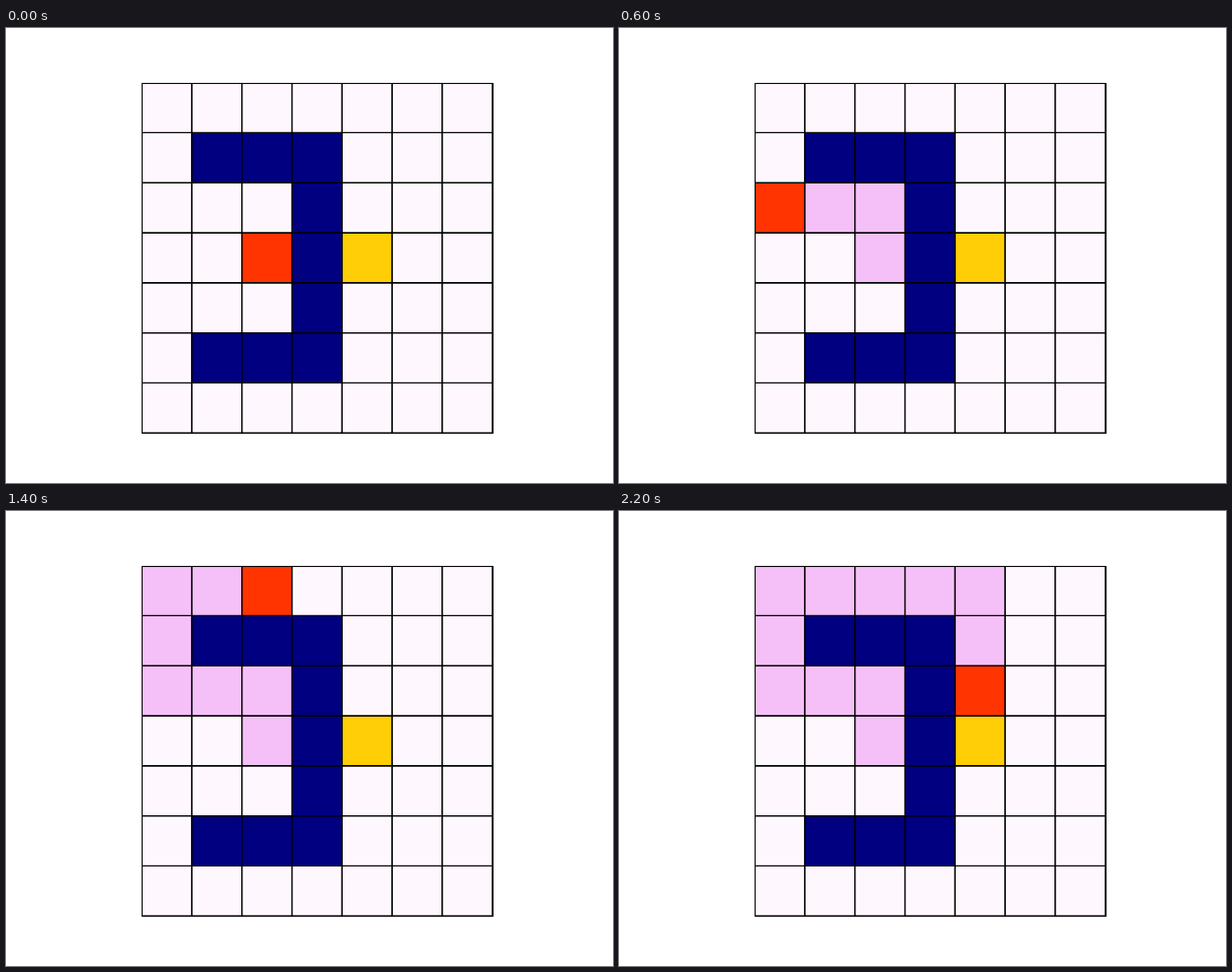
Animation of 640 by 480 pixels, one loop 2.6 s. Source, as an HTML page with a canvas:

```html
<!DOCTYPE html>
<html lang="en">
<head>
<meta charset="utf-8">
<title>Grid walk</title>
<style>
html, body { margin: 0; width: 100%; height: 100%; overflow: hidden; background: #fff; }
canvas { display: block; }
</style>
</head>
<body>
<canvas id="stage" width="640" height="480"></canvas>
<script>
const ctx = document.getElementById('stage').getContext('2d');

const LOOP = 2600, STEP = 200;
const N = 7, CELL = 52.8, LEFT = 143.2, TOP = 57.6;
const EMPTY = 'rgb(254,248,254)', WALL = 'rgb(0,0,128)', TRAIL = 'rgb(245,192,247)';
const WALKER = 'rgb(255,52,0)', GOAL = 'rgb(255,206,6)';

const map = [
  '.......',
  '.###...',
  '...#...',
  '...#G..',
  '...#...',
  '.###...',
  '.......'
];
const moves = { U: [0, -1], D: [0, 1], L: [-1, 0], R: [1, 0] };

// Cells visited in order, from the start cell
const path = [[2, 3]];
for (const m of 'ULLUURRRRDD') {
  const [x, y] = path[path.length - 1];
  path.push([x + moves[m][0], y + moves[m][1]]);
}

function cellColor(x, y, step) {
  const visit = path.findIndex(p => p[0] === x && p[1] === y);
  if (visit === step) return WALKER;
  if (visit >= 0 && visit < step) return TRAIL;
  return { '#': WALL, G: GOAL }[map[y][x]] || EMPTY;
}

function draw(step) {
  ctx.fillStyle = '#fff';
  ctx.fillRect(0, 0, 640, 480);
  ctx.strokeStyle = '#000';

  ctx.save();
  ctx.beginPath();
  ctx.rect(143, 58, 370, 369);
  ctx.clip();
  ctx.lineWidth = 100 / 72;
  // Bottom row first, so upper cells overlap lower ones
  for (let y = N - 1; y >= 0; y--) {
    for (let x = 0; x < N; x++) {
      ctx.beginPath();
      ctx.rect(LEFT + x * CELL, TOP + y * CELL, CELL, CELL);
      ctx.fillStyle = cellColor(x, y, step);
      ctx.fill();
      ctx.stroke();
    }
  }
  ctx.restore();

  ctx.lineWidth = 80 / 72;
  ctx.strokeRect(143.5, 58.5, 370, 369);
}

let shown = -1;
function tick() {
  const t = performance.now() % LOOP;
  const step = Math.min(Math.floor(t / STEP), path.length - 1);
  if (step !== shown) draw(shown = step);
  requestAnimationFrame(tick);
}
tick();
</script>
</body>
</html>
```
